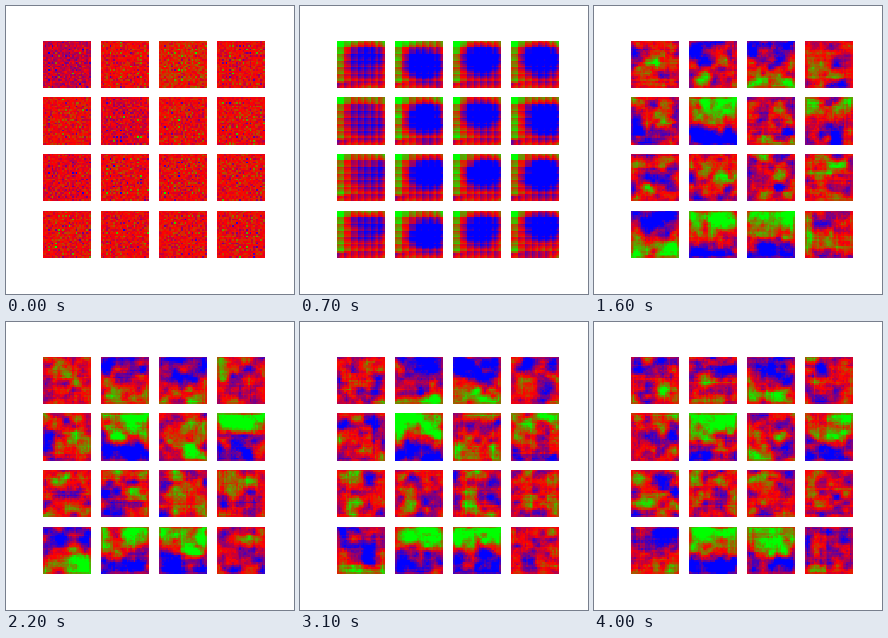
Recreate the animation shown at these times as a matplotlib script. Size 288 by 288 pixels, loop 4100 ms.

```python
import numpy as np
import matplotlib.pyplot as plt
from matplotlib.animation import FuncAnimation

FRAMES, STEP_MS = 41, 100
N, TILES = 28, 16
KNOT = 6  # frames between two independent cloud layouts

# Lean of a tile: positive is green above and blue below, negative the reverse.
LEAN = {1: -.2, 2: -.4, 5: .5, 7: .4, 12: -.3, 13: .45, 14: .45}
# Tiles whose first noise is clearly purple or brown.
TINT = {0: -.11, 2: .06, 5: -.05, 8: -.04}

row, col = np.mgrid[:N, :N]
u, v = (col + .5) / N, (row + .5) / N
edge = np.minimum.reduce([row, col, N - 1 - row, N - 1 - col])
notch = ((col % 4) + (row % 4)) / 6 - .5


def per_tile(values):
    return np.reshape(values, (TILES, 1, 1))


def from_dict(values):
    return per_tile([values.get(i, 0) for i in range(TILES)])


def spread(cells):
    """Matrix that stretches a coarse line of cells smoothly to N pixels."""
    at = np.linspace(0, cells - 1, N)[:, None]
    d = np.clip(abs(at - np.arange(cells)), 0, 1)
    return 1 - d * d * (3 - 2 * d)


def cloud(rng, rows, cols):
    return spread(rows) @ rng.normal(size=(TILES, rows, cols)) @ spread(cols).T


def speckle(rng):
    """Red noise whose dots sit mostly on every second row and column."""
    dots = np.where((row % 2) & (col % 2), .17, .07) * np.where(edge < 3, .8, 1)
    return .5 + from_dict(TINT) + dots * rng.normal(size=(TILES, N, N))


def first_shapes():
    """Blue disc right of the centre inside a green top left border."""
    rng = np.random.default_rng(8)
    cx, cy = (per_tile(rng.normal(mean, .05, TILES)) for mean in (.64, .43))
    depth = np.where(np.arange(TILES) % 4, .6, .3)
    d2 = ((u - cx) / .42) ** 2 + ((v - cy) / .34) ** 2
    border = .4 * np.exp(-(u / .2) ** 2) * (v < .9) + .4 * np.exp(-(v / .13) ** 2)
    ground = .42 + border - per_tile(depth) * np.exp(-d2 ** 2)
    return ground + .07 * cloud(rng, 6, 4)


def layout(knot):
    rng = np.random.default_rng(40 + knot)
    return .22 * cloud(rng, 5, 4) + .13 * cloud(rng, 8, 7)


def drifting(k):
    """Blend of neighbouring layouts that keeps the same contrast."""
    i, t = divmod(k / KNOT, 1)
    angle = t * np.pi / 2
    return np.cos(angle) * layout(int(i)) + np.sin(angle) * layout(int(i) + 1)


def streaks(rng):
    across = rng.normal(size=(TILES, N, 1)) * (row[:, :1] % 2)
    down = rng.normal(size=(TILES, 1, N)) * (col[:1] % 2)
    return across + down


def learned(k, rng):
    slope = 1.1 * np.tanh(4 * (.58 - v))
    field = .45 + drifting(k) + from_dict(LEAN) * slope
    field += .08 * cloud(rng, 11, 10) + .035 * cloud(rng, N, N)
    field += .04 * streaks(rng)
    return np.where(edge == 0, .6 * field + .17, field)


def mix(a, b, t):
    t = np.clip(t, 0, 1)
    return a + (b - a) * t * t * (3 - 2 * t)


FIRST = first_shapes()


def tiles_at(k):
    rng = np.random.default_rng(100 + k)
    noise = speckle(rng)
    texture = np.interp(k, [0, 3, 7, 12, 16], [0, .2, .38, .15, .03]) * notch
    early = mix(noise, FIRST + texture, k / 6)
    return mix(early, learned(k, rng) + texture, (k - 7) / 6)


fig, axes = plt.subplots(
    4, 4, figsize=(4, 4), dpi=72, facecolor="white",
    gridspec_kw=dict(left=.125, right=.9, bottom=.125, top=.88,
                     wspace=.2, hspace=.2))
images = []
for ax in axes.flat:
    ax.axis("off")
    images.append(ax.imshow(np.zeros((N, N)), cmap="brg", vmin=0, vmax=1,
                            interpolation="nearest"))


def update(k):
    for image, tile in zip(images, tiles_at(k)):
        image.set_data(tile)
    return images


anim = FuncAnimation(fig, update, frames=FRAMES, interval=STEP_MS,
                     init_func=lambda: update(0), repeat=True, repeat_delay=0)
plt.show()
```
